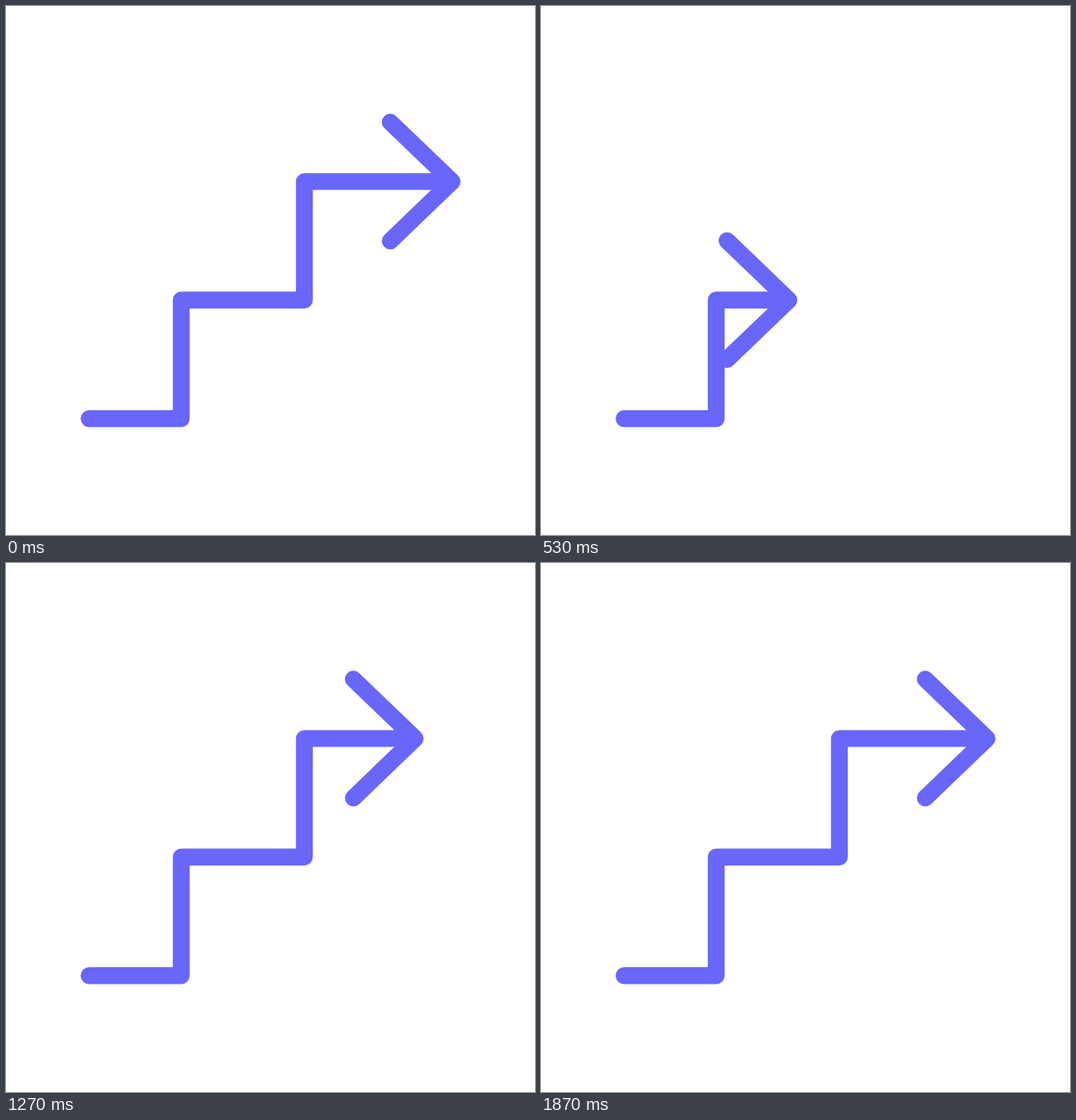
These frames come from a looping animation (640 px wide and 640 px high, 2000 ms). An HTML page:

```html
<!DOCTYPE html>
<html lang="en">
<head>
<meta charset="utf-8">
<title>Step arrow</title>
<style>
  html, body { margin: 0; width: 100%; height: 100%; overflow: hidden; background: #fff; }
  svg { display: block; width: 100%; height: 100%; }
  path { fill: none; stroke: #6966fa; stroke-width: 20.4; stroke-linecap: round; stroke-linejoin: round; }
</style>
</head>
<body>
<svg viewBox="0 0 640 640">
  <path id="stairs" d="M100.5 499.2H212V355.8H361V212.4H539.7"/>
  <path id="head" d="M-74.8 -71.9L0 0L-74.8 71.9"/>
</svg>
<script>
  const LOOP = 2000, FPS = 30;
  const stairs = document.getElementById("stairs");
  const head = document.getElementById("head");

  // Distances along the stairs where the arrow turns, and the far end.
  const LOW = 254.9, MIDDLE = 403.9, HIGH = 547.3, END = 726;

  // [frame, distance travelled, eased]
  const keys = [
    [0, END], [10, HIGH], [20.6, 186], [22, 226.2], [31, 537.7],
    [31.4, HIGH], [40.2, END], [48, 684.3, true], [56, END, true], [60, END]
  ];

  const smooth = u => u * u * (3 - 2 * u);
  const ramp = (x, from, to) => smooth(Math.min(1, Math.max(0, (x - from) / (to - from))));
  const turn = (distance, corner) => ramp(distance, corner - 11, corner + 19);

  function distanceAt(frame) {
    const i = keys.findIndex(key => frame < key[0]);
    const [t0, d0] = keys[i - 1];
    const [t1, d1, eased] = keys[i];
    const u = (frame - t0) / (t1 - t0);
    return d0 + (d1 - d0) * (eased ? smooth(u) : u);
  }

  function draw(ms) {
    const frame = Math.floor((ms % LOOP + 4) * FPS / 1000) % (LOOP * FPS / 1000);
    const distance = distanceAt(frame);
    const low = turn(distance, LOW);
    const middle = turn(distance, MIDDLE);
    const high = turn(distance, HIGH);
    const angle = 90 * (low - middle + high - 1);
    const shift = 4.2 * middle * (1 - high);
    const tip = stairs.getPointAtLength(distance);

    stairs.setAttribute("stroke-dasharray", `${distance - 12} 2000`);
    head.setAttribute("transform", `translate(${tip.x + shift} ${tip.y}) rotate(${angle})`);
  }

  const start = performance.now();
  function tick(now) {
    draw(Math.max(0, now - start));
    requestAnimationFrame(tick);
  }
  draw(0);
  requestAnimationFrame(tick);
</script>
</body>
</html>
```
